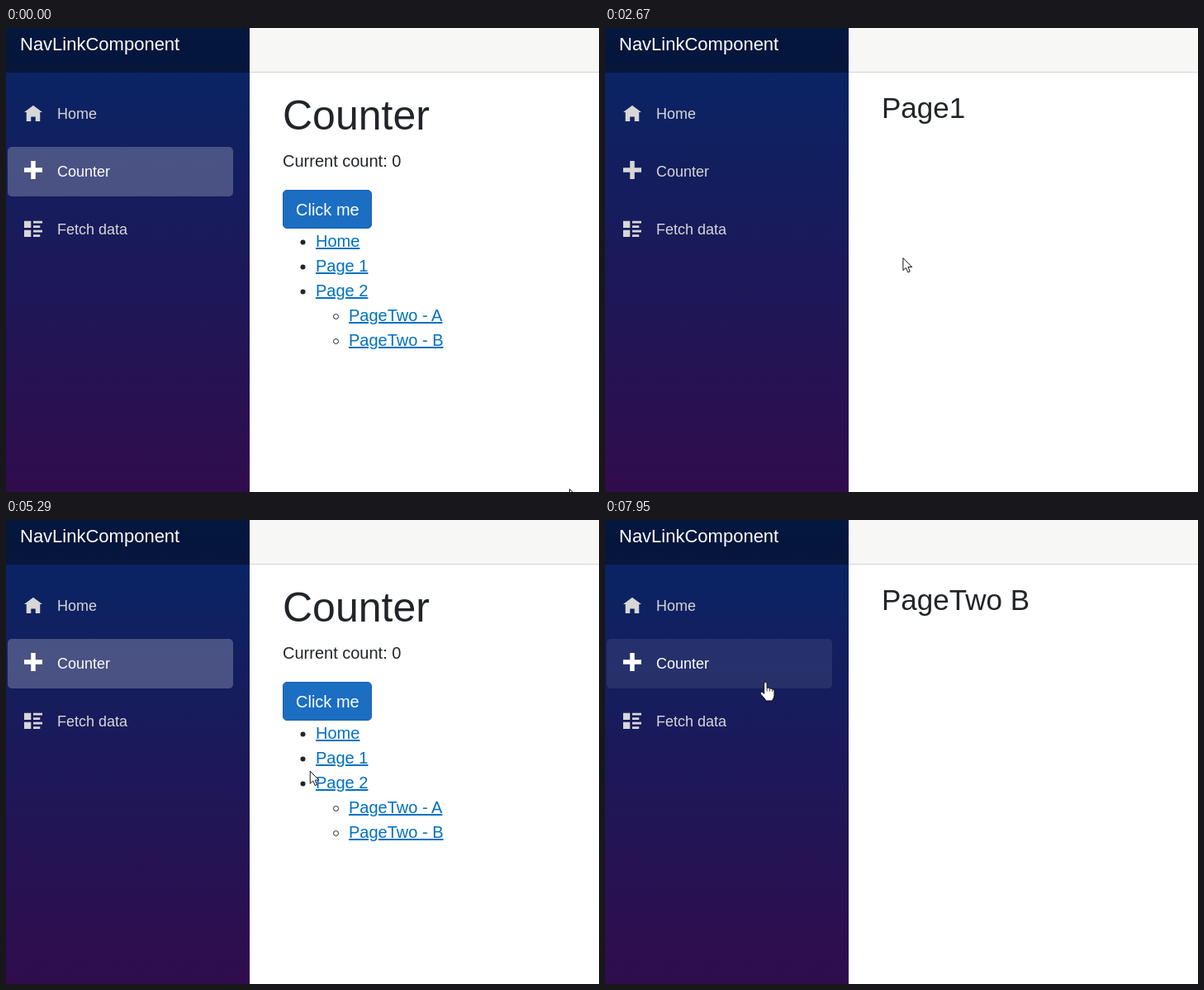
These frames come from a looping animation (718x562 px, 8 s). An HTML page:

```html
<!DOCTYPE html>
<html lang="en">
<head>
<meta charset="utf-8">
<title>NavLinkComponent</title>
<style>
  html, body { margin: 0; width: 100%; height: 100%; overflow: hidden; background: #fff; }
  svg { display: block; width: 718px; height: 562px; }
  text { font: 20px "Liberation Sans", Arial, sans-serif; fill: #212529; white-space: pre; }
  .brand { font-size: 22px; fill: #fff; }
  .item { fill: #d7d7d7; }
  .item.on { fill: #fff; }
  .item text { font-size: 18px; fill: inherit; }
  .item rect { fill: #fff; fill-opacity: 0; }
  .big { font-size: 50px; }
  .mid { font-size: 35px; }
  .link { fill: #0071c1; text-decoration: underline; }
  .link.on { fill: #0056b3; }
  .page { visibility: hidden; }
  .alert text { fill: #41464b; }
  .cursor { fill: #fff; stroke: #111; stroke-linejoin: round; }
</style>
</head>
<body>
<svg viewBox="0 0 718 562">
  <defs>
    <linearGradient id="side" gradientUnits="userSpaceOnUse" x1="0" y1="-16" x2="0" y2="690">
      <stop offset="0" stop-color="#052767"/>
      <stop offset="1" stop-color="#3a0647"/>
    </linearGradient>
  </defs>

  <rect width="718" height="562" fill="#fff"/>
  <rect x="295" width="423" height="53" fill="#f7f7f5"/>
  <rect x="295" y="53" width="423" height="1" fill="#d6d5d5"/>
  <rect width="295" height="562" fill="url(#side)"/>
  <rect width="295" height="54" fill="#000" fill-opacity=".4"/>
  <text class="brand" x="17" y="27">NavLinkComponent</text>

  <g class="item">
    <rect x="2" y="74" width="273" height="60" rx="5"/>
    <path transform="translate(22 93.75) scale(2.75)" d="M4 0l-4 3h1v4h2v-2h2v2h2v-4h1z"/>
    <text x="62" y="110">Home</text>
  </g>
  <g class="item">
    <rect x="2" y="144" width="273" height="60" rx="5"/>
    <path transform="translate(22 161) scale(2.75)" d="M3 0v3h-3v2h3v3h2v-3h3v-2h-3v-3z"/>
    <text x="62" y="180">Counter</text>
  </g>
  <g class="item">
    <rect x="2" y="214" width="273" height="60" rx="5"/>
    <path transform="translate(22 233.75) scale(2.75)" d="M0 0v3h3v-3zM4 0v1h4v-1zM4 2v1h3v-1zM0 4v3h3v-3zM4 4v1h4v-1zM4 6v1h3v-1z"/>
    <text x="62" y="250">Fetch data</text>
  </g>

  <g class="page" id="counter">
    <text class="big" x="335" y="123">Counter</text>
    <text x="335" y="168">Current count: 0</text>
    <rect id="button" x="335.5" y="196.5" width="107" height="46" rx="4.5" fill="#1b6ec2" stroke="#1861ac"/>
    <text x="351" y="227" style="fill:#fff">Click me</text>
    <g fill="#212529">
      <circle cx="359.5" cy="259.5" r="3"/>
      <circle cx="359.5" cy="289.5" r="3"/>
      <circle cx="359.5" cy="319.5" r="3"/>
    </g>
    <g fill="none" stroke="#212529">
      <circle cx="399.5" cy="349.5" r="3"/>
      <circle cx="399.5" cy="379.5" r="3"/>
    </g>
    <text class="link" x="375" y="265">Home</text>
    <text class="link" x="375" y="295">Page 1</text>
    <text class="link" x="375" y="325">Page 2</text>
    <text class="link" x="415" y="355">PageTwo - A</text>
    <text class="link" x="415" y="385">PageTwo - B</text>
  </g>

  <g class="page" id="home">
    <text class="big" x="335" y="123">Hello, world!</text>
    <text x="335" y="168">Welcome to your new app.</text>
    <g class="alert">
      <rect x="335.5" y="206.5" width="420" height="71" rx="4.5" fill="#e2e3e5" stroke="#d3d6d8"/>
      <path transform="translate(355 231) scale(2.5)" fill="#41464b" d="M6 0l-1 1 2 2 1-1zM4 2l-4 4v2h2l4-4z"/>
      <text x="391" y="249"><tspan font-weight="bold">How is Blazor working for you?</tspan> Please take our</text>
    </g>
  </g>

  <text class="page mid" id="sub" x="335" y="109"></text>

  <g id="pointer">
    <path class="cursor" id="arrow" d="M.5.5V15.5L4 12.3L6.4 17.8L8.8 16.8L6.5 11.4H11.3Z"/>
    <g class="cursor" id="hand" transform="translate(-.5 0)">
      <path d="M-1.8 1.6a1.7 1.7 0 0 1 3.4 0V7q2.6-1 3.3.8 2.4-.9 3.1.9 2.4-.5 2.5 1.9V16q0 3-2 5v1.5H-.2V21L-5.6 14.8q-1.4-2 .4-2.8 1.4-.5 3.4 2z"/>
      <path fill="none" stroke-width=".8" d="M1.6 7v4M4.9 8v3.2M8 9v2.5"/>
    </g>
    <circle id="press" r="15" fill="#ff0" fill-opacity=".46"/>
  </g>
</svg>

<script>
  const LOOP = 8000, TRAVEL = 420, LINK_PRESS = 200, NAV_PRESS = 130;
  const $ = id => document.getElementById(id);
  const items = [...document.querySelectorAll('.item')];
  const links = [...document.querySelectorAll('.link')];

  // Each visit: reach a link, open its page, return to Counter by pressing at aim
  const visits = [
    { page: 'Home', reach: 440, open: 620, back: 1430, aim: [188, 180] },
    { page: 'Page1', reach: 2000, open: 2540, back: 3350, aim: [190, 178] },
    { page: 'Page2', reach: 3770, open: 3970, back: 4800, aim: [184, 175] },
    { page: 'PageTwo A', reach: 5430, open: 5630, back: 6450, aim: [188, 178] },
    { page: 'PageTwo B', reach: 7150, open: 7480, back: 8130, aim: [194, 196] }
  ];

  // Pointer stops as [ms, x, y]
  const path = [[0, 682, 558]];
  visits.forEach(({ reach, open, back, aim }, i) => {
    const link = [380 + 17 * i, 258 + 30 * i];
    const bend = [237 + 2.3 * i, 243 - 3 * i];
    const [, x, y] = path[path.length - 1];
    path.push([reach - TRAVEL, x, y], [reach, ...link], [open + 60, ...link],
      [open + 270, ...bend], [back - NAV_PRESS, ...aim]);
  });

  const same = (a, b) => a[1] === b[1] && a[2] === b[2];

  function slope(i, axis) {
    const a = path[i - 1], p = path[i], b = path[i + 1];
    if (!a || !b || same(a, p) || same(p, b)) return 0;
    return (b[axis] - a[axis]) / (b[0] - a[0]);
  }

  // Cubic Hermite through the stops, at rest where the pointer pauses
  function pointer(t) {
    t = Math.max(0, t);
    let i = 0;
    while (i < path.length - 2 && path[i + 1][0] <= t) i++;
    const a = path[i], b = path[i + 1], d = b[0] - a[0];
    const u = (t - a[0]) / d, v = 1 - u;
    return [1, 2].map(k =>
      a[k] * (1 + 2 * u) * v * v + b[k] * u * u * (3 - 2 * u) +
      d * (slope(i, k) * u * v * v - slope(i + 1, k) * u * u * v));
  }

  // Hit test against an element's own box
  function hitArea(el) {
    const b = el.getBBox();
    return ([x, y]) => x >= b.x && x < b.x + b.width && y >= b.y && y < b.y + b.height;
  }
  const onItem = items.map(el => hitArea(el.firstElementChild));
  const onLink = links.map(hitArea);
  const onButton = hitArea($('button'));

  const show = (el, on) => el.style.visibility = on ? 'visible' : 'hidden';
  const justBefore = (t, end, span) => t >= end - span && t < end;

  function draw(t) {
    const visit = visits.find(v => t >= v.open && t < v.back);
    const page = visit ? visit.page : 'Counter';
    const active = ['Home', 'Counter'].indexOf(page);
    const pos = pointer(t);

    show($('home'), active === 0);
    show($('counter'), active === 1);
    show($('sub'), active < 0);
    $('sub').textContent = page;

    // Highlights trail the pointer slightly
    const trail = [45, 65, 85, 105].map(lag => pointer(t - lag));
    items.forEach((el, i) => {
      const rest = i === active ? .23 : 0;
      const level = trail.reduce((sum, p) => sum + (onItem[i](p) ? .11 : rest), 0) / trail.length;
      el.firstElementChild.style.fillOpacity = level;
      el.classList.toggle('on', i === active || level > .08);
    });

    const over = links.map((el, i) => active === 1 && onLink[i](pos));
    links.forEach((el, i) => el.classList.toggle('on', over[i]));
    const hand = over.includes(true) || onItem.some(hit => hit(pos)) || active === 1 && onButton(pos);

    show($('arrow'), !hand);
    show($('hand'), hand);
    show($('press'), visits.some(v => justBefore(t, v.open, LINK_PRESS) || justBefore(t, v.back, NAV_PRESS)));
    $('pointer').setAttribute('transform', `translate(${pos[0].toFixed(2)} ${pos[1].toFixed(2)})`);
  }

  const start = performance.now();
  function tick() {
    draw((performance.now() - start) % LOOP);
    requestAnimationFrame(tick);
  }
  tick();
</script>
</body>
</html>
```
